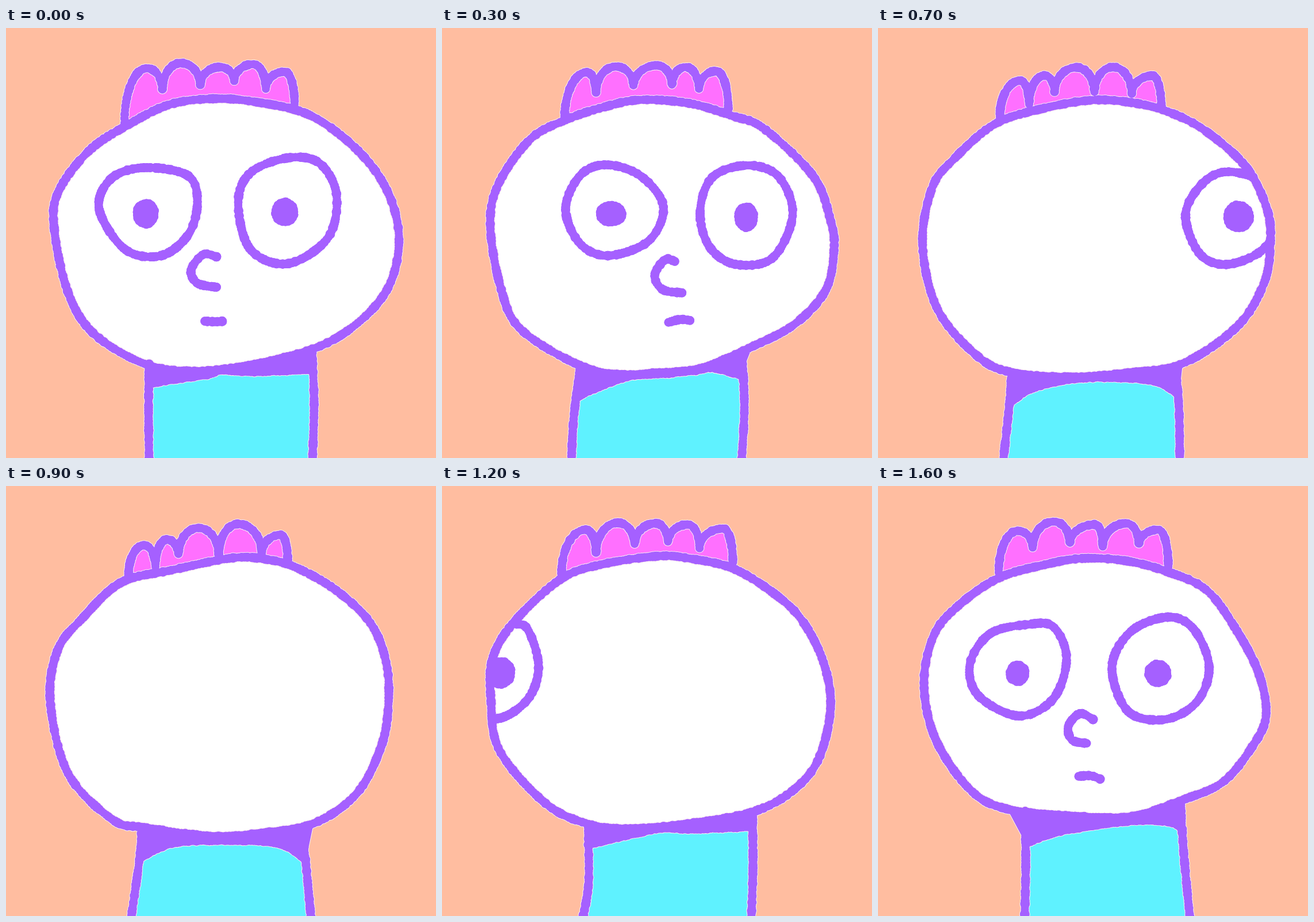
Write an HTML page with a canvas that moves like this. It is 748 px wide and 748 px high and loops after 1800 ms.

```html
<!DOCTYPE html>
<html lang="en">
<head>
<meta charset="utf-8">
<title>Turning head</title>
<style>
  html, body { margin: 0; height: 100%; overflow: hidden; background: #ffbda0; }
  canvas { display: block; width: 748px; height: 748px; }
</style>
</head>
<body>
<canvas width="748" height="748"></canvas>
<script>
const ctx = document.querySelector('canvas').getContext('2d');
const STEP = 100, LOOP = 1800, LAST = 16;
const TURN = 110; // sideways travel per step for features hidden behind the head
const PURPLE = '#a560ff', PINK = '#ff70ff', CYAN = '#5ff2ff', PALE = '#fff0f0';
const FACE = ['eyeL', 'eyeR', 'pupilL', 'pupilR', 'nose', 'mouth'];
const poses = [];

// Hair alternates valleys and tips; a pupil is its centre and the corner of its box.
function pose(step, parts, power = 1) {
  for (const name in parts) {
    parts[name] = parts[name].split(' ').map(p => p.split(',').map(Number));
  }
  poses.push({ step, parts, power });
}

pose(0, {
  head: '360,123 430,128 520,148 590,193 645,252 676,317 683,385 663,455 612,513 540,556 430,585 330,597 243,585 153,532 108,460 84,350 91,285 145,213 215,167 285,133',
  hair: '206,165 245,70 272,108 304,61 338,100 372,68 397,93 430,63 452,106 485,76 502,132',
  eyeL: '240,243 315,256 333,300 318,358 270,396 207,385 162,315 183,262',
  eyeR: '490,226 545,235 575,290 560,365 490,410 425,385 404,305 425,252',
  pupilL: '243,323 265,348', pupilR: '485,320 508,344',
  nose: '366,398 343,394 322,421 333,444 367,451',
  mouth: '346,510 363,511 379,510',
  left: '249,585 248,665 249,756', right: '532,560 536,650 533,756',
  collar: '249,632 264,624 350,611 375,603 430,606 534,602'
}, 1.5);
pose(3, {
  head: '345,125 430,131 505,153 560,175 646,258 676,335 682,385 668,455 615,514 540,554 440,594 320,603 240,587 138,525 103,455 84,345 98,272 153,194 215,160 280,138',
  hair: '213,160 252,77 268,112 303,67 333,101 374,65 400,100 424,68 447,107 477,75 498,140',
  eyeL: '285,238 345,257 385,310 360,370 290,396 240,375 215,315 240,257',
  eyeR: '530,239 585,258 610,325 575,400 510,411 465,380 449,320 470,260',
  pupilL: '294,323 320,345', pupilR: '529,329 549,354',
  nose: '405,406 388,403 370,430 384,455 421,461',
  mouth: '394,512 415,507 433,509',
  left: '240,590 229,680 225,756', right: '522,568 526,660 521,756',
  collar: '233,652 262,637 335,612 440,604 470,599 520,612'
});
pose(5, {
  head: '350,126 430,132 500,148 560,173 645,243 692,322 700,370 690,435 640,503 525,580 420,596 320,605 235,606 165,565 100,480 78,380 98,272 130,227 205,167 280,135',
  hair: '211,152 255,80 266,125 300,72 314,105 356,64 383,105 414,70 438,112 478,81 496,150',
  eyeL: '390,250 455,270 478,310 455,380 390,411 340,393 315,325 345,270',
  eyeR: '605,262 660,262 712,315 690,365 640,395 574,385 561,330 580,280',
  pupilL: '407,328 433,355', pupilR: '634,328 658,353',
  nose: '517,412 500,420 492,440 503,459 533,456',
  mouth: '525,506 545,501 566,502',
  left: '229,605 225,660 218,756', right: '520,585 526,670 519,756',
  collar: '226,664 262,636 330,617 385,607 485,614 526,634'
});
pose(9, {
  head: '395,125 455,128 505,142 575,182 635,240 662,310 665,385 652,455 610,535 535,587 440,604 360,609 240,594 185,580 108,500 77,375 90,285 133,230 200,168 290,146',
  hair: '213,157 240,103 260,140 280,93 300,120 335,73 370,120 404,66 445,118 478,85 490,130',
  left: '236,595 232,650 217,756', right: '514,595 521,650 531,756',
  collar: '233,655 265,638 305,627 390,625 475,630 522,658'
});
pose(12, {
  head: '375,122 430,126 505,143 575,185 625,232 663,305 676,385 655,475 610,530 540,567 430,587 330,596 255,588 180,552 100,460 85,370 88,300 125,237 205,163 275,137',
  hair: '208,152 250,76 268,117 306,64 335,102 372,65 393,98 428,67 448,108 490,74 506,135',
  eyeR: '130,240 152,255 168,315 150,370 100,404 50,390 30,320 70,250',
  pupilR: '102,325 127,352',
  left: '254,590 255,690 244,756', right: '540,570 541,660 538,756',
  collar: '254,632 300,621 335,613 385,603 430,605 540,601'
});
pose(14, {
  head: '375,124 430,130 515,155 600,207 650,275 675,330 680,385 668,450 628,527 545,577 415,600 330,595 250,580 170,530 110,455 78,355 97,280 150,203 185,172 265,142',
  hair: '214,150 247,79 268,125 307,70 338,115 378,67 391,102 426,68 443,118 488,78 514,145',
  eyeL: '130,240 160,258 176,300 160,365 100,412 60,400 40,320 80,250',
  eyeR: '390,240 445,260 472,325 440,393 385,407 330,385 300,325 330,260',
  pupilL: '115,335 137,357', pupilR: '376,331 396,358',
  nose: '229,395 205,403 188,427 207,455 230,454',
  mouth: '251,517 268,514 287,515',
  left: '257,585 257,660 257,756', right: '527,580 531,650 537,756',
  collar: '257,655 272,636 310,619 415,610 490,615 531,632'
}, 0.6);
pose(16, {
  head: '355,126 430,130 500,148 570,180 620,245 662,325 675,400 650,455 600,515 530,546 440,575 340,574 225,562 160,528 100,440 80,345 97,260 140,208 210,160 290,137',
  hair: '210,150 243,78 269,107 306,62 334,100 378,67 391,105 432,65 454,102 488,76 505,140',
  eyeL: '260,241 305,245 328,300 305,370 245,400 175,365 160,310 195,257',
  eyeR: '505,228 550,250 576,315 555,375 500,406 435,392 407,315 440,253',
  pupilL: '243,326 263,347', pupilR: '487,326 510,349',
  nose: '374,406 351,396 331,418 338,442 366,448',
  mouth: '349,505 370,504 387,510',
  left: '256,565 257,660 255,756', right: '526,550 532,640 543,756',
  collar: '257,630 300,613 350,603 440,591 505,592 530,605'
});

const shift = (pts, dx, dy = 0) => pts.map(([x, y]) => [x + dx, y + dy]);

// Blend the poses around a step; hidden features leave right and return left.
function poseAt(step) {
  const i = Math.max(0, poses.findIndex(p => p.step >= step) - 1);
  const a = poses[i], b = poses[i + 1], span = b.step - a.step;
  const k = ((step - a.step) / span) ** a.power;
  const parts = {};
  for (const name of new Set([...Object.keys(a.parts), ...Object.keys(b.parts)])) {
    const from = a.parts[name] || shift(b.parts[name], -TURN * span);
    const to = b.parts[name] || shift(from, TURN * span);
    parts[name] = from.map((p, n) => p.map((v, axis) => v + (to[n][axis] - v) * k));
  }
  return parts;
}

const SAMPLES = 40;
function spline(pts, closed) {
  const n = pts.length, out = [];
  const at = i => pts[closed ? (i + n) % n : Math.min(n - 1, Math.max(0, i))];
  for (let i = 0; i < (closed ? n : n - 1); i++) {
    const [a, b, c, d] = [at(i - 1), at(i), at(i + 1), at(i + 2)];
    for (let j = 0; j < SAMPLES; j++) {
      const t = j / SAMPLES;
      out.push([0, 1].map(k => b[k] + t / 2 * (c[k] - a[k]
        + t * (2 * a[k] - 5 * b[k] + 4 * c[k] - d[k]
        + t * (3 * (b[k] - c[k]) + d[k] - a[k])))));
    }
  }
  out.push(at(closed ? 0 : n - 1));
  return out;
}

// Quarter ellipses: upright at the valleys, level at the tips.
function tufts(pts) {
  const out = [];
  for (let i = 0; i + 1 < pts.length; i++) {
    const [x0, y0] = pts[i], [x1, y1] = pts[i + 1];
    for (let j = 0; j <= SAMPLES; j++) {
      const s = Math.sin(j / SAMPLES * Math.PI / 2), c = 1 - Math.cos(j / SAMPLES * Math.PI / 2);
      const [u, v] = i % 2 ? [s, c] : [c, s];
      out.push([x0 + (x1 - x0) * u, y0 + (y1 - y0) * v]);
    }
  }
  return out;
}

let seed;
const random = () => (seed = (seed * 16807) % 2147483647) / 2147483647;

function polygon(pts, path = new Path2D()) {
  pts.forEach(([x, y], i) => i ? path.lineTo(x, y) : path.moveTo(x, y));
  path.closePath();
  return path;
}

// A rough marker line made of overlapping dabs.
function ink(path, line) {
  let gap = 0, last = line[0];
  for (const [x, y] of line) {
    gap -= Math.hypot(x - last[0], y - last[1]);
    last = [x, y];
    if (gap > 0) continue;
    const r = 7 + random() * 1.5;
    path.moveTo(x + r, y);
    path.arc(x, y, r, 0, 2 * Math.PI);
    gap = 4;
  }
}

function pupil(path, [[x, y], [right, bottom]]) {
  const rx = right - x - 7, ry = bottom - y - 7, rim = [];
  for (let a = 0; a < 2 * Math.PI; a += 0.1) {
    rim.push([x + rx * Math.cos(a), y + ry * Math.sin(a)]);
  }
  polygon(rim, path);
  ink(path, rim);
}

function paint(path, color) {
  ctx.fillStyle = color;
  ctx.fill(path);
}

function draw(step) {
  seed = 7919 * (step + 1);
  const p = poseAt(step);
  const head = spline(p.head, true), hair = tufts(p.hair);
  const left = spline(p.left), right = spline(p.right);
  const collar = shift(p.collar, 0, -8);
  const skull = polygon(head);

  ctx.fillStyle = '#ffbda0';
  ctx.fillRect(0, 0, 748, 748);
  paint(polygon([...collar, ...p.right.slice(1), ...p.left.slice(1).reverse()]), CYAN);
  paint(polygon(hair), PINK);
  paint(skull, '#fff');

  const face = new Path2D();
  for (const name of FACE) {
    if (!p[name]) continue;
    if (name.startsWith('pupil')) pupil(face, p[name]);
    else ink(face, spline(p[name], name.startsWith('eye')));
  }
  ctx.save();
  ctx.clip(skull);
  paint(face, PURPLE);
  ctx.restore();

  const outline = new Path2D();
  const chin = head.slice(9 * SAMPLES, 12 * SAMPLES + 1).reverse();
  polygon([...chin, ...collar.slice().reverse()], outline);
  for (const line of [head, hair, left, right, spline(collar)]) ink(outline, line);
  ctx.strokeStyle = PALE;
  ctx.lineWidth = 2;
  ctx.stroke(outline);
  paint(outline, PURPLE);

  // Features meet the rim without a pale seam.
  ctx.save();
  ctx.clip(skull);
  paint(face, PURPLE);
  ctx.restore();
}

let shown = -1;
function tick() {
  const step = Math.min(LAST, Math.floor(performance.now() % LOOP / STEP));
  if (step !== shown) draw(shown = step);
  requestAnimationFrame(tick);
}
tick();
</script>
</body>
</html>
```
